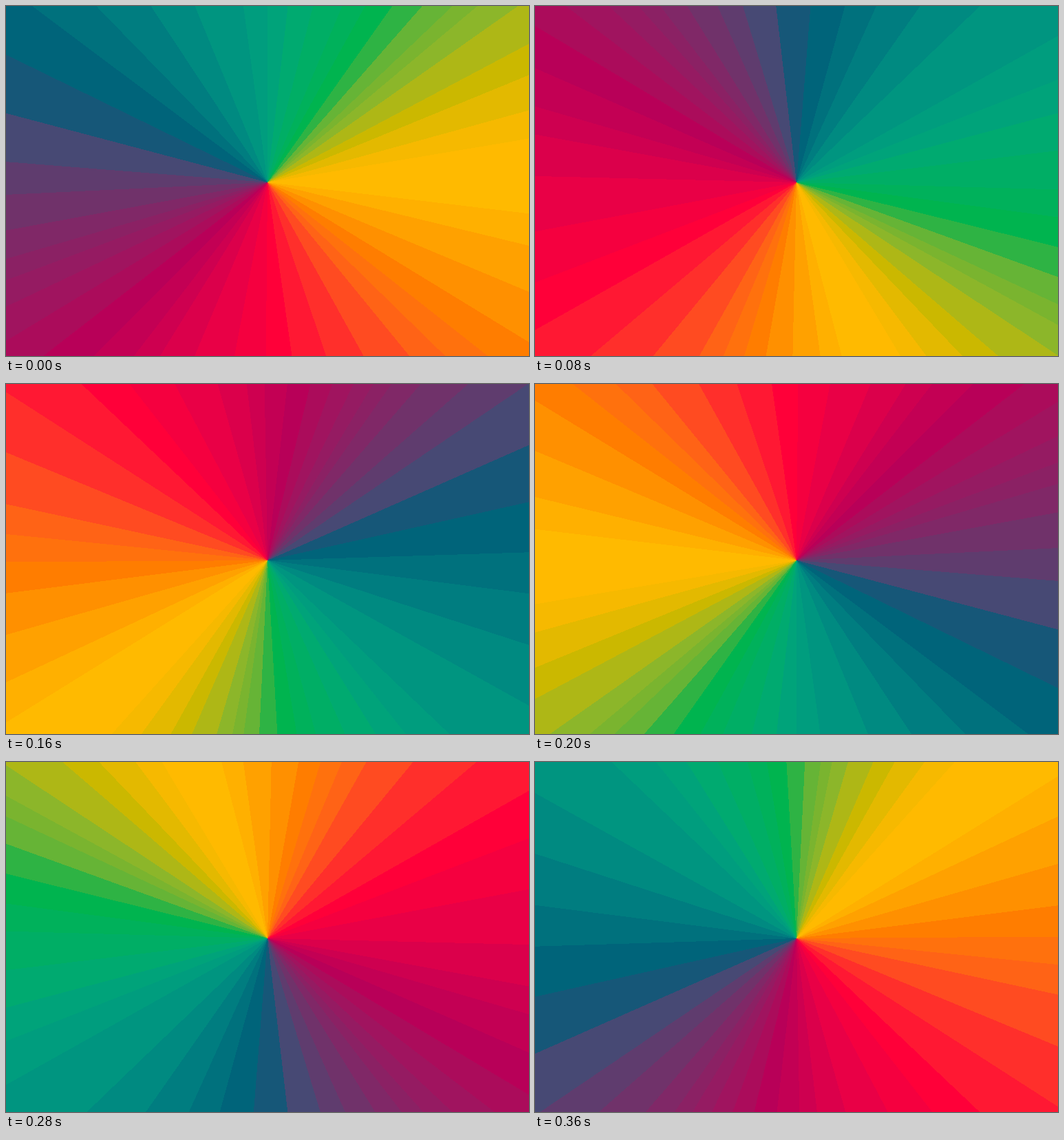
An HTML page for the animation above (400 ms loop, 760 by 508 pixels).

```html
<!DOCTYPE html>
<html>
<head>
<meta charset="utf-8">
<title>Spinning colour wheel</title>
<style>
  html, body { margin: 0; width: 100%; height: 100%; overflow: hidden; }
</style>
</head>
<body>
<script>
// Colour bands clockwise from the top: colour and the angle where it ends
const bands = `
  00a37a 6.6, 00aa70 14.5, 00ae65 23, 00b15b 29, 00b44f 35.3,
  2eb344 41.3, 66b436 46.4, 7ab42f 50, 8cb62a 54.9, aeb716 62.1,
  cbb800 67.7, e3b900 74.6, f6b900 80.5, ffba00 96.8, ffb000 103.6,
  ffa100 112.7, ff9000 121.4, ff7d00 128.2, ff710d 134.3, ff6316 140.7,
  ff4b21 151, ff2f2b 161.3, ff1833 172, ff0039 180.5, f5003f 190.8,
  e90046 202.8, db004b 211.8, ce0050 217.6, c30054 225, b80058 232.3,
  ab0c5b 238.8, a0145f 244.6, 951b62 249.5, 8b2164 253.7, 802867 259.6,
  70326a 267.3, 5f3c6e 274.5, 474974 284.8, 165778 296, 00647a 306.8,
  00717d 315.8, 007d80 326.5, 008a81 337.6, 009580 352.2, 009d7e 360`;

const stops = bands.split(',').map(band => {
  const [colour, end] = band.trim().split(' ');
  return `#${colour} 0 ${end}deg`;
}).join(',');

// Uneven steps of one half turn, in 84ths of a full turn
const halfTurn = [0, 9, 16, 26, 33];
const stepTime = 40;
let lastStep = -1;

function draw() {
  const step = Math.floor(performance.now() / stepTime) % 10;
  if (step !== lastStep) {
    const turn = (halfTurn[step % 5] + (step < 5 ? 0 : 42)) / 84;
    document.body.style.background =
      `conic-gradient(from ${turn}turn at 380px 256px, ${stops})`;
    lastStep = step;
  }
  requestAnimationFrame(draw);
}
draw();
</script>
</body>
</html>
```
